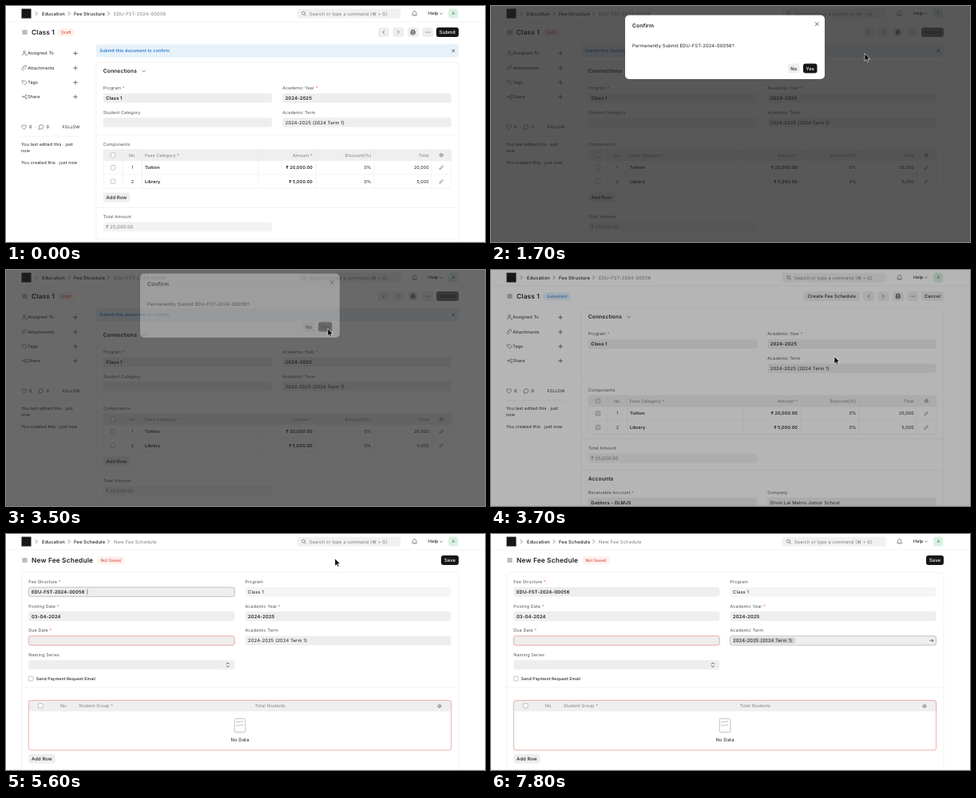
An HTML page for the animation above (8800 ms loop, 600 px wide and 297 px high).

```html
<!DOCTYPE html>
<html lang="en">
<head>
<meta charset="utf-8">
<title>Fee schedule</title>
<style>
html, body { margin: 0; height: 100%; overflow: hidden; background: #fff; }
svg { display: block; width: 100vw; height: 100vh; }
text {
  font-family: Inter, "Noto Sans", sans-serif;
  letter-spacing: .02em;
  text-rendering: geometricPrecision;
  white-space: pre;
}
</style>
</head>
<body>
<svg id="stage" viewBox="0 0 600 297"></svg>
<script>
const INK = '#1f1f1f', MUTED = '#7c7c7c', LABEL = '#525252', LINE = '#e6e6e6', FILL = '#eeeeee', RED = '#e07a76';
const S = 5.42, M = 5.85, L = 6.67;

// Drawing helpers; text is placed by its vertical centre.
function text(x, y, str, { size = M, weight = 400, fill = INK, at = 'start' } = {}) {
  const body = str.replace(/ \*$/, ` <tspan fill="#e0625e">*</tspan>`);
  return `<text x="${x}" y="${y + size * .364}" font-size="${size}" font-weight="${weight}" fill="${fill}" text-anchor="${at}">${body}</text>`;
}
const rect = (x, y, w, h, r, fill, stroke = 'none', sw = .5) =>
  `<rect x="${x}" y="${y}" width="${w}" height="${h}" rx="${r}" fill="${fill}" stroke="${stroke}" stroke-width="${sw}"/>`;
const path = (d, stroke = LABEL, sw = .6, fill = 'none') =>
  `<path d="${d}" fill="${fill}" stroke="${stroke}" stroke-width="${sw}" stroke-linecap="round" stroke-linejoin="round"/>`;
const hline = (x1, x2, y) => path(`M${x1} ${y}H${x2}`, LINE, .5);
const vline = (x, y1, y2) => path(`M${x} ${y1}V${y2}`, LINE, .5);
const right = (x, y, c = LABEL) => path(`M${x - 1} ${y - 2}l2 2l-2 2`, c, .7);
const left = (x, y) => path(`M${x + 1} ${y - 2}l-2 2l2 2`, LABEL, .7);
const down = (x, y, r = 2) => path(`M${x - r} ${y - r / 2}l${r} ${r}l${r} ${-r}`, LABEL, .7);
const plus = (x, y) => path(`M${x - 2.3} ${y}h4.6M${x} ${y - 2.3}v4.6`, INK, .6);
const cross = (x, y, r) => path(`M${x - r} ${y - r}l${2 * r} ${2 * r}m0 ${-2 * r}l${-2 * r} ${2 * r}`, INK, .7);
const box = (x, y, fill = '#fff') => rect(x - 2.8, y - 2.8, 5.6, 5.6, 1.2, fill, '#8a8a8a', .5);
const gear = (x, y) => `<circle cx="${x}" cy="${y}" r="2" fill="none" stroke="${LABEL}" stroke-width=".9" stroke-dasharray="1 .35"/>` +
  `<circle cx="${x}" cy="${y}" r=".8" fill="none" stroke="${LABEL}" stroke-width=".5"/>`;
const pencil = (x, y) => path(`M${x - 2} ${y + 2}l.4 -1.4l2.8 -2.8l1 1l-2.8 2.8z`, LABEL, .6);
const group = (id, body) => `<g id="${id}">${body}</g>`;

function button(x, y, w, label, { bg = FILL, ink = INK, id = '' } = {}) {
  return `<g id="${id}">${rect(x, y, w, 12, 3, bg)}${text(x + w / 2, y + 6, label, { weight: 500, fill: ink, at: 'middle' })}</g>`;
}
function pill(w, x, label, bg, ink) {
  return rect(x, 28.2, w, 10, 4.5, bg) + text(x + w / 2, 33.2, label, { size: 5, weight: 500, fill: ink, at: 'middle' });
}
function field(x, y, w, label, value = '', { bold = false, ink = INK, bg = FILL, border = 'none' } = {}) {
  return text(x, y, label, { size: S, fill: LABEL }) + rect(x, y + 7, w, 11.8, 3.2, bg, border, .6) +
    text(x + 3.6, y + 12.9, value, { weight: bold ? 600 : 400, fill: ink });
}

function navbar(doctype, doc) {
  return rect(19.5, 3.5, 12, 12, 0, '#171717') +
    right(38.2, 9.5) + text(45, 9.5, 'Education', { weight: 500 }) +
    right(79.2, 9.5) + text(85, 9.5, doctype, { weight: 500 }) +
    right(128.7, 9.5) + text(135, 9.5, doc, { fill: MUTED }) +
    rect(364.7, 3.5, 130, 12, 3.2, '#f1f1f1') +
    `<circle cx="372.6" cy="9.1" r="2" fill="none" stroke="${LABEL}" stroke-width=".6"/>` + path('M374.1 10.6l1.6 1.6') +
    text(380, 9.5, 'Search or type a command (⌘ + G)', { size: 5.63, fill: MUTED }) +
    path('M508.9 11q.8-1 .8-2.6q0-2 2-2t2 2q0 1.600.8 2.600zM510.8 12.200q.9 1 1.800 0') +
    text(529, 9.5, 'Help', { weight: 500, size: S }) + down(545, 9.7, 1.4) +
    rect(554.3, 3.5, 12, 12, 3.2, '#daf0e1') + text(560.3, 9.5, 'A', { size: S, fill: '#2f8a57', at: 'middle' }) +
    hline(0, 600, 20) +
    [-2, 0, 2].map(d => path(`M20.8 ${33 + d}h5.4`, INK, .6)).join('');
}

function sidebar() {
  const rows = [['Assigned To', 59.5], ['Attachments', 78], ['Tags', 96.2], ['Share', 114.3]];
  const icons = [
    'M20.5 62q0-2.500 2.500-2.500q1.500 0 2.200.8M24.300 61.800h2.400',
    'M21 77.500l2.500-2.500q1.200-.8 2 .3q.6.9-.3 1.800l-3 3q-1.500.9-2.200-.6q-.2-.8.6-1.500l2.500-2.500',
    'M20.500 94h3l2.700 2.500l-2.500 2.500l-3.200-2.800z',
    'M25.500 112.500l-4 1.800l4 1.800'];
  return rows.map(([s, y], i) => path(icons[i]) + text(27.2, y, s, { size: S }) + plus(87, y)).join('') +
    `<circle cx="22.9" cy="57.7" r="1.300" fill="none" stroke="${LABEL}" stroke-width=".6"/>` +
    [[21.3, 114.3], [25.5, 112.5], [25.5, 116.1]].map(([x, y]) => `<circle cx="${x}" cy="${y}" r=".9" fill="#fff" stroke="${LABEL}" stroke-width=".5"/>`).join('') +
    path('M22.500 155l-2.600-2.700q-.9-1.400.3-2.400q1.300-.7 2.300.7q1-1.400 2.300-.7q1.200 1 .3 2.400z') +
    text(29, 152.2, '0', { size: S }) + text(36.3, 152.2, '·', { size: S }) +
    path('M41.300 155v-3q0-2.500 2.700-2.500t2.700 2.700t-2.700 2.700z') +
    text(50.5, 152.2, '0', { size: S }) + text(70.5, 152.2, 'FOLLOW', { size: 5.05 }) +
    hline(19, 94, 164) +
    text(19, 173.6, 'You last edited this · just', { size: S }) + text(19, 182, 'now', { size: S }) +
    text(19, 197, 'You created this · just now', { size: S });
}

function feeTable(y, locked) {
  const bot = y + 49, tick = locked ? '#e2e2e2' : '#fff', head = { size: S, fill: MUTED }, end = { size: S, at: 'end' };
  let out = rect(122, y, 436, 49, 3, '#fff', LINE) + rect(122.2, y + .2, 435.6, 13.8, 3, '#efefef') +
    [14, 31.4].map(d => hline(122, 558, y + d)).join('') +
    [146, 170.5, 316, 388, 461, 533].map(x => vline(x, y, bot)).join('') +
    box(134, y + 7, tick) + text(158.5, y + 7, 'No.', { ...head, at: 'middle' }) +
    text(174, y + 7, 'Fees Category *', head) + text(384, y + 7, 'Amount *', { ...head, at: 'end' }) +
    text(457.500, y + 7, 'Discount(%)', { ...head, at: 'end' }) + text(529.8, y + 7, 'Total', { ...head, at: 'end' }) + gear(545.3, y + 7);
  [['Tuition', '20,000'], ['Library', '5,000']].forEach(([name, sum], i) => {
    const cy = y + 22.7 + i * 17.5;
    out += box(134, cy, tick) + text(158.5, cy, String(i + 1), { size: S, at: 'middle' }) +
      text(174, cy, name, { size: S, weight: 600 }) + text(384, cy, `₹ ${sum}.00`, { ...end, weight: 600 }) +
      text(457.500, cy, '0%', end) + text(529.8, cy, sum, end) + pencil(545.3, cy);
  });
  return out;
}

function structure(submitted) {
  const d = submitted ? -22.8 : 0, c1 = 121.7, c2 = 346.2, w = 211.5;
  let out = navbar('Fee Structure', 'EDU-FST-2024-00056') + text(32, 33, 'Class 1', { size: 8.34, weight: 600 }) + sidebar() +
    [466, 484.4, 502.800, 521.2].map(x => rect(x, 27, 14, 12, 3, FILL)).join('') + left(473, 33) + right(491.4, 33) +
    path('M508 31.800v-1.600h3.600v1.600M507.300 34.700v-2.700h5v2.700M508.300 33.700h3v2h-3z', INK, .7) +
    [525.9, 528.2, 530.5].map(x => `<circle cx="${x}" cy="33" r=".5" fill="${INK}"/>`).join('') +
    rect(113, 71 + d, 454, 300, 3.5, '#fff', LINE) +
    text(c1, 81.5 + d, 'Connections', { size: L, weight: 600 }) + down(172.5, 82 + d) +
    field(c1, 103 + d, w, 'Program *', 'Class 1', { bold: true }) +
    field(c2, 103 + d, w, 'Academic Year *', '2024-2025', { bold: true }) +
    field(c2, 133.6 + d, w, 'Academic Term', '2024-2025 (2024 Term 1)') +
    hline(113, 567, 162 + d) + text(c1, 173.6 + d, 'Components', { size: S, fill: LABEL }) +
    feeTable(180.6 + d, submitted);
  const ty = submitted ? 224 : 265;
  out += hline(113, 567, ty - 11.5) + field(c1, ty, w, 'Total Amount', '₹ 25,000.00', { ink: MUTED, bg: '#f3f3f3' }) + hline(113, 567, ty + 27.8);
  if (submitted) {
    out += pill(35, 65, 'Submitted', '#e3f1fd', '#2a7dc9') +
      button(392, 27, 70, 'Create Fee Schedule') + button(539, 27, 28, 'Cancel') +
      text(c1, 263, 'Accounts', { size: L, weight: 600 }) +
      field(c1, 279.6, w, 'Receivable Account *', 'Debtors - OLMJS', { bold: true }) +
      field(c2, 279.6, w, 'Company', 'Orvin Lal Mehru Junior School');
  } else {
    out += pill(20.5, 65.2, 'Draft', '#fff0ec', '#d3483c') +
      button(539, 27, 28, 'Submit', { bg: '#171717', ink: '#fff', id: 'submitOn' }) +
      button(539, 27, 28, 'Submit', { bg: '#6a6a6a', ink: '#222', id: 'submitOff' }) +
      rect(113, 48.2, 454, 16.4, 3.2, '#e6f1fa') +
      text(117.3, 56.5, 'Submit this document to confirm', { size: S, weight: 500, fill: '#1668b8' }) + cross(560.4, 56.3, 1.5) +
      field(c1, 133.6, w, 'Student Category') + button(121.7, 234.8, 33.3, 'Add Row');
  }
  return out + hline(0, 600, 296.5);
}

function schedule() {
  const c1 = 28.3, c2 = 299.5, w = 258, head = { size: S, fill: MUTED };
  const ring = (x, y) => rect(x, y, w, 11.8, 3.2, 'none', '#c4c4c4', 1.1);
  return navbar('Fee Schedule', 'New Fee Schedule') + text(32, 33, 'New Fee Schedule', { size: 8.34, weight: 600 }) +
    pill(34.5, 114, 'Not Saved', '#fff0ec', '#d3483c') + button(545, 27, 22, 'Save', { bg: '#171717', ink: '#fff' }) +
    rect(19.5, 48.3, 547.5, 300, 3.5, '#fff', LINE) +
    field(c1, 60, w, 'Fee Structure *', 'EDU-FST-2024-00056', { bold: true }) +
    field(c1, 90.6, w, 'Posting Date *', '03-04-2024', { bold: true }) +
    field(c1, 121.2, w, 'Due Date *', '', { border: RED }) +
    field(c1, 151.8, w, 'Naming Series') + path('M276.200 163.600l1.600-1.600l1.600 1.600M276.200 166l1.600 1.600l1.600-1.600', INK, .7) +
    field(c2, 60, w, 'Program', 'Class 1', { bg: '#f5f5f5' }) +
    field(c2, 90.6, w, 'Academic Year *', '2024-2025', { bold: true }) +
    field(c2, 121.2, w, 'Academic Term') +
    group('focusA', ring(c1, 67) + path('M102 70v5.800', INK, .5)) +
    group('focusB', rect(302.8, 130.500, 78, 7.2, 0, '#d2d2d2') + ring(c2, 128.2) +
      path('M549.600 134.100h4.400M552.400 132.500l1.600 1.600l-1.600 1.600', INK, .6)) +
    text(303.1, 134.1, '2024-2025 (2024 Term 1)') +
    box(31.1, 182) + text(37.8, 182, 'Send Payment Request Email', { size: 5.15, weight: 500 }) +
    hline(19.5, 567, 193.2) +
    rect(28.3, 209.4, 529.4, 62.6, 3, '#fff') + rect(28.3, 209.4, 529.4, 13.8, 3, '#efefef') +
    rect(28.3, 209.4, 529.4, 62.6, 3, 'none', RED, .6) +
    box(43.3, 216.2) + text(72.5, 216.4, 'No.', { ...head, at: 'middle' }) + text(91, 216.4, 'Student Group *', head) +
    text(350, 216.4, 'Total Students', { ...head, at: 'end' }) + gear(543, 216.6) +
    rect(286.3, 232.3, 13.6, 17, 1.5, '#fff', '#a8a8a8', .7) +
    [236.5, 241].map(y => path(`M288.500 ${y}h1.600m1 0h2m1.200 -.6h2.500`, '#a8a8a8', .8)).join('') +
    text(293, 258.5, 'No Data', { at: 'middle' }) + button(28.3, 276.800, 33.3, 'Add Row') + hline(0, 600, 296.5);
}

const modal = rect(168, 11.6, 250, 80.4, 5, '#fff') + text(177, 25, 'Confirm', { size: L, weight: 600 }) + cross(408.2, 22.6, 2) +
  text(177, 50, 'Permanently Submit EDU-FST-2024-00056?') + button(372, 72.6, 14.6, 'No') +
  button(391, 72.6, 17.5, 'Yes', { bg: '#171717', ink: '#fff', id: 'yesOn' }) +
  button(391, 72.6, 17.5, 'Yes', { bg: '#666', ink: '#222', id: 'yesOff' });

document.getElementById('stage').innerHTML = rect(0, 0, 600, 297, 0, '#fff') +
  group('draft', structure(false)) + group('submitted', structure(true)) + group('schedule', schedule()) +
  group('shade', rect(0, 0, 600, 297, 0, '#202020')) + group('modal', modal) +
  group('arrow', path('M0 0V9.200L2.100 7.200L3.500 10.300L5 9.600L3.600 6.600H6.500Z', '#fff', .6, '#000')) +
  group('beam', path('M-1.600 -4.400q1.600 0 1.600 1v6.800q0 1 -1.600 1M1.600 -4.400q-1.600 0 -1.600 1v6.800q0 1 1.600 1', '#222', .7));

// Step tables: time in ms, then values.
const LOOP = 8800;
const SHADE = [[1300, 0], [1400, .37], [1500, .5], [1600, .69], [1700, .75], [3400, .75], [3500, .67], [3600, .5], [3700, .33], [3800, .12], [3900, 0]];
const MODAL = [[1400, 0, -21], [1500, .3, -14], [1600, .9, -4], [1700, 1, 0], [3400, 1, 0], [3500, .35, -7], [3600, 0, -14]];
const POINTER = [[200, 587, 210], [300, 492, 108], [400, 423, 44], [500, 423, 44], [1200, 547, 35], [1400, 547, 35],
  [1700, 468, 60], [2200, 402, 74], [2700, 402, 74], [2800, 403, 74], [3500, 403, 74], [3600, 414, 88], [3700, 430, 109],
  [4500, 356, 119], [4600, 358, 123], [4700, 358, 123], [5100, 427, 32], [5300, 424, 33], [5600, 412, 31],
  [5700, 410, 24], [5900, 410, 24], [6800, 340, 138], [7200, 336, 134], [7700, 258.5, 130]];

function sample(steps, t) {
  const i = steps.findIndex(s => s[0] > t);
  if (i === 0) return steps[0].slice(1);
  if (i < 0) return steps[steps.length - 1].slice(1);
  const a = steps[i - 1], b = steps[i], k = (t - a[0]) / (b[0] - a[0]);
  return a.slice(1).map((v, j) => v + (b[j + 1] - v) * k);
}

const el = id => document.getElementById(id);
const show = (id, on) => el(id).style.display = on ? '' : 'none';

function draw(ms) {
  const t = Math.floor((ms % LOOP) / 100) * 100;
  show('draft', t < 3700);
  show('submitted', t >= 3700 && t < 5200);
  show('schedule', t >= 5200);
  show('submitOn', t < 1300);
  show('submitOff', t >= 1300);
  show('yesOn', t < 2900);
  show('yesOff', t >= 2900);
  show('focusA', t < 7200);
  show('focusB', t >= 7200);
  el('shade').setAttribute('opacity', sample(SHADE, t)[0]);
  const [alpha, dy] = sample(MODAL, t);
  el('modal').setAttribute('opacity', alpha);
  el('modal').setAttribute('transform', `translate(0 ${dy})`);
  const [x, y] = sample(POINTER, t), typing = t >= 6800;
  show('arrow', t >= 200 && !typing);
  show('beam', typing && t < 7800);
  for (const id of ['arrow', 'beam']) el(id).setAttribute('transform', `translate(${x} ${y})`);
}

const start = performance.now();
function tick() {
  draw(performance.now() - start);
  requestAnimationFrame(tick);
}
tick();
</script>
</body>
</html>
```
